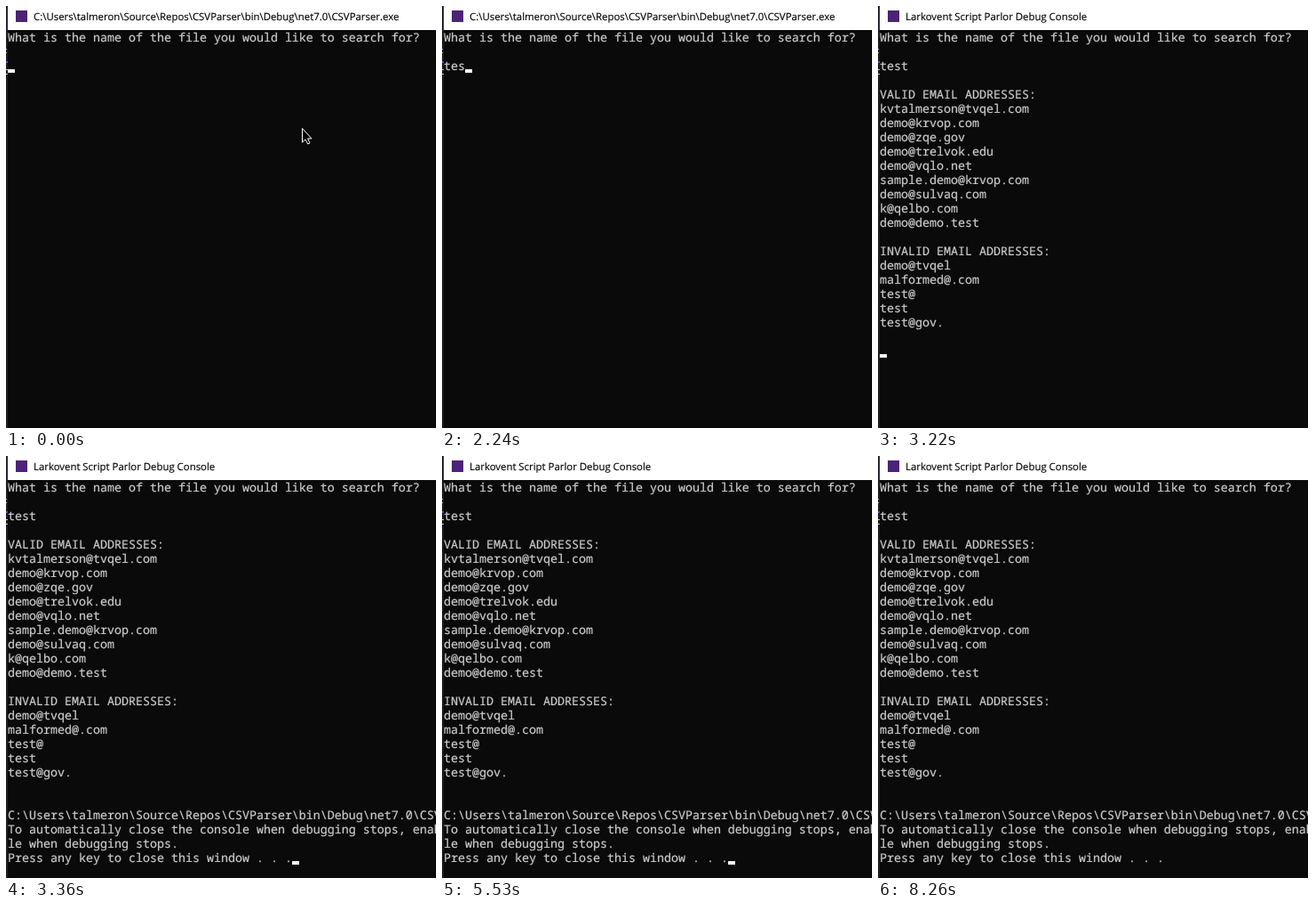
Write an HTML page that moves like this. It is 484 px wide and 474 px high and loops after 8400 ms.

```html
<!DOCTYPE html>
<html lang="en">
<head>
<meta charset="utf-8">
<title>Console</title>
<style>
  html, body { margin: 0; width: 100%; height: 100%; overflow: hidden; background: #0a0a0a; }
  svg { display: block; width: 484px; height: 474px; }
  text { white-space: pre; text-rendering: geometricPrecision; }
  #title { font: 11.4px "Open Sans", "Noto Sans", sans-serif; fill: #000; stroke: #000; stroke-width: .15; }
  #rows { font: 13.3333px "Noto Sans Mono", "DejaVu Sans Mono", monospace; fill: #ccc; stroke: #ccc; stroke-width: .2; }
  rect { shape-rendering: crispEdges; }
</style>
</head>
<body>
<svg id="stage" viewBox="0 0 484 474">
  <rect width="484" height="474" fill="#0a0a0a"/>
  <g id="edge">
    <rect width="2" height="474" fill="#1e1e1e"/>
    <rect width="2" height="27" fill="#25252e"/>
    <rect y="48" width="1" height="1" fill="#b0b0b0"/>
    <rect y="52" width="1" height="1" fill="#b0b0b0"/>
    <rect y="62" width="2" height="2" fill="#5a50b0"/>
    <rect y="71" width="2" height="1" fill="#c8c8c8"/>
    <rect y="76" width="2" height="1" fill="#c8c8c8"/>
  </g>
  <rect x="2" width="482" height="27" fill="#fff"/>
  <rect x="11" y="5" width="13" height="13" fill="#4b2378"/>
  <text id="title" x="31" y="16"></text>
  <g id="rows"></g>
  <rect id="caret" width="8" height="4" fill="#f2f2f2"/>
  <path id="pointer" d="M333.5 137.5V153.2L337.1 149.8L339.7 155L342 153.9L339.6 148.9H344Z"
        fill="#000" stroke="#fff" stroke-linejoin="round"/>
</svg>
<script>
const LOOP = 8400, LEFT = 2, TOP = 27, CELL = 8, LINE = 16;
const PATH = "C:\\Users\\talmeron\\Source\\Repos\\CSVParser\\bin\\Debug\\net7.0\\CSVParser.exe";
const DONE_TITLE = "Larkovent Script Parlor Debug Console";
const INPUT_ROW = 2;

// Blocks of output: time shown, first row, lines
const output = [
  [0, 0, ["What is the name of the file you would like to search for?"]],
  [3080, 4, ["VALID EMAIL ADDRESSES:"]],
  [3150, 5, ["kvtalmerson@tvqel.com"]],
  [3220, 6, [
    "demo@krvop.com", "demo@zqe.gov", "demo@trelvok.edu", "demo@vqlo.net",
    "sample.demo@krvop.com", "demo@sulvaq.com", "k@qelbo.com", "demo@demo.test",
    "", "INVALID EMAIL ADDRESSES:",
    "demo@tvqel", "malformed@.com", "test@", "test", "test@gov."
  ]],
  [3360, 23, [
    PATH,
    "To automatically close the console when debugging stops, enable Tools",
    "le when debugging stops.",
    "Press any key to close this window . . ."
  ]]
];
const keyTimes = [1470, 2100, 2240, 2520];
// The caret starts visible and flips at each time
const flips = [420, 1050, 1610, 2100, 2870, 3220, 4060, 4480, 5110, 5530, 7210, 7700, 8260];

const $ = id => document.getElementById(id);
const passed = (times, t) => times.filter(at => at <= t).length;
const show = (el, on) => el.setAttribute("visibility", on ? "visible" : "hidden");

function addRow(row, str) {
  const el = document.createElementNS($("stage").namespaceURI, "text");
  el.setAttribute("x", LEFT);
  el.setAttribute("y", TOP + row * LINE + 13);
  el.textContent = str;
  return $("rows").appendChild(el);
}

const input = addRow(INPUT_ROW, "");
const lines = output.flatMap(([at, first, strs]) =>
  strs.map((str, i) => ({ at, el: addRow(first + i, str) })));

function placeCaret(col, row) {
  $("caret").setAttribute("x", LEFT + col * CELL);
  $("caret").setAttribute("y", TOP + (row + 1) * LINE - 4);
}

function render(t) {
  const typed = passed(keyTimes, t);
  input.textContent = "test".slice(0, typed);
  $("title").textContent = t < 3220 ? PATH : DONE_TITLE;
  for (const { at, el } of lines) show(el, t >= at);

  if (t < 3220) placeCaret(typed, INPUT_ROW);
  else if (t < 3360) placeCaret(0, 22);
  else placeCaret(40, 26);
  show($("caret"), passed(flips, t) % 2 === 0);
  show($("pointer"), t < 1470);
}

const start = performance.now();
function tick() {
  render((performance.now() - start) % LOOP);
  requestAnimationFrame(tick);
}
tick();
</script>
</body>
</html>
```
